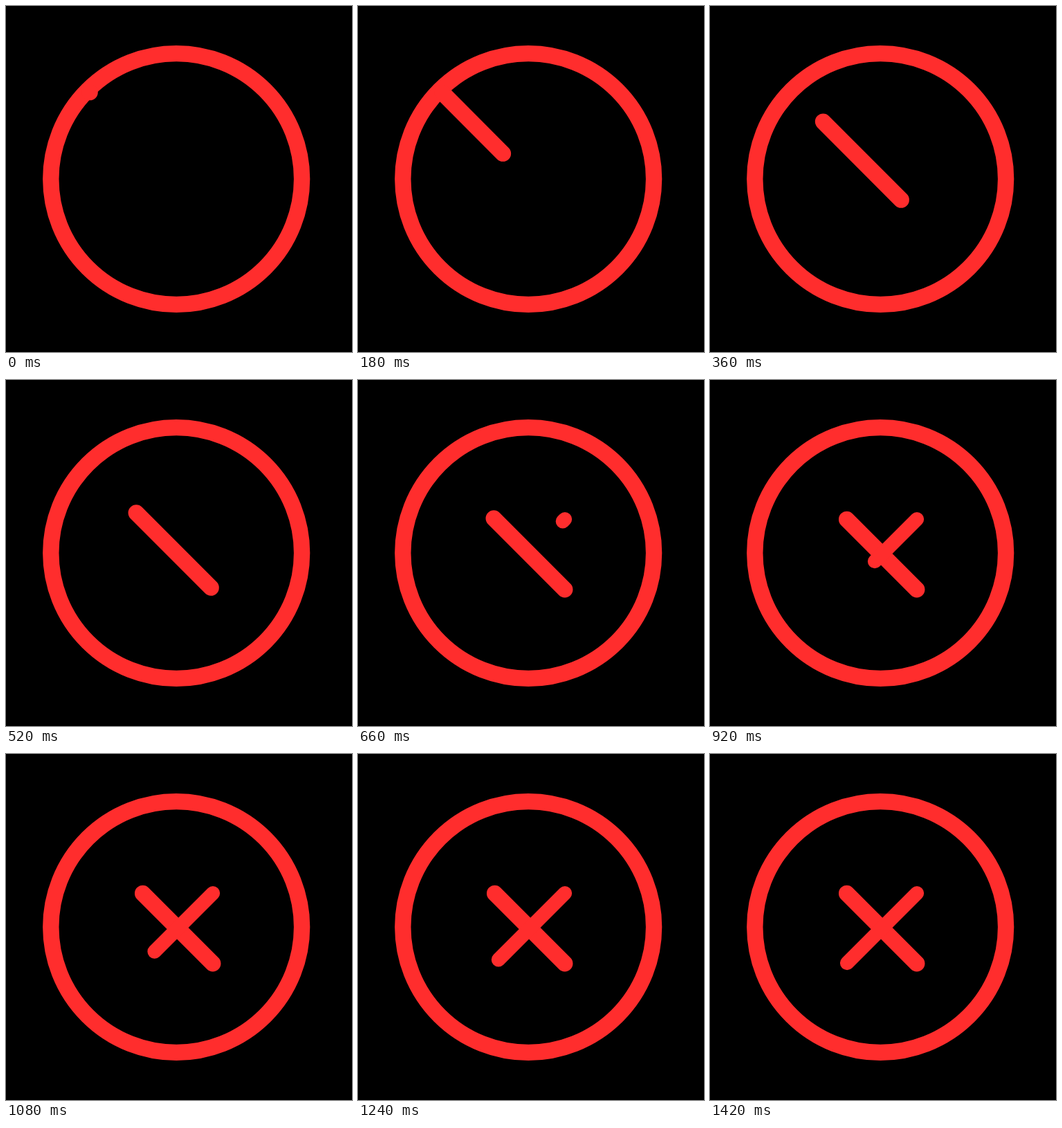
These frames come from a looping animation (500 px wide and 500 px high, 1640 ms). An HTML page:

```html
<!DOCTYPE html>
<html lang="en">
<head>
<meta charset="utf-8">
<title>Cross in a circle</title>
<style>
  @property --head { syntax: "<length>"; inherits: false; initial-value: 0px; }
  @property --tail { syntax: "<length>"; inherits: false; initial-value: 0px; }

  html, body { margin: 0; width: 100%; height: 100%; overflow: hidden; background: #000; }
  svg {
    display: block; width: 100%; height: 100%;
    fill: none; stroke: #ff2d2d; stroke-width: 23.4; stroke-linecap: round;
    --settle: cubic-bezier(.2, .17, .22, 1);
  }

  /* Each bar is one dash running from --tail to --head along its path */
  .bar {
    stroke-dasharray: calc(var(--head) - var(--tail)) 999px;
    stroke-dashoffset: calc(-1 * var(--tail));
    animation: 1640ms linear infinite;
  }
  .down { animation-name: down-head, down-tail; }
  .up { stroke-width: 20.4; animation-name: up-head, up-show; }

  @keyframes down-head {
    0% { --head: 0px; animation-timing-function: var(--settle); }
    37.8%, 100% { --head: 251.8px; }
  }
  @keyframes down-tail {
    0% { --tail: 0px; }
    10.25% { --tail: 0px; animation-timing-function: var(--settle); }
    46.83%, 100% { --tail: 108.6px; }
  }
  @keyframes up-head {
    0% { --head: 0px; }
    37.8% { --head: 0px; animation-timing-function: var(--settle); }
    90.49%, 100% { --head: 143.2px; }
  }
  @keyframes up-show {
    0% { opacity: 0; animation-timing-function: step-end; }
    37.8%, 100% { opacity: 1; }
  }
</style>
</head>
<body>
<svg viewBox="0 0 500 500">
  <circle cx="246.2" cy="250" r="181.4"/>
  <path class="bar down" d="M121 124.5L298.8 302.8"/>
  <path class="bar up" d="M299 201.1L197.8 302.4"/>
</svg>
</body>
</html>
```
